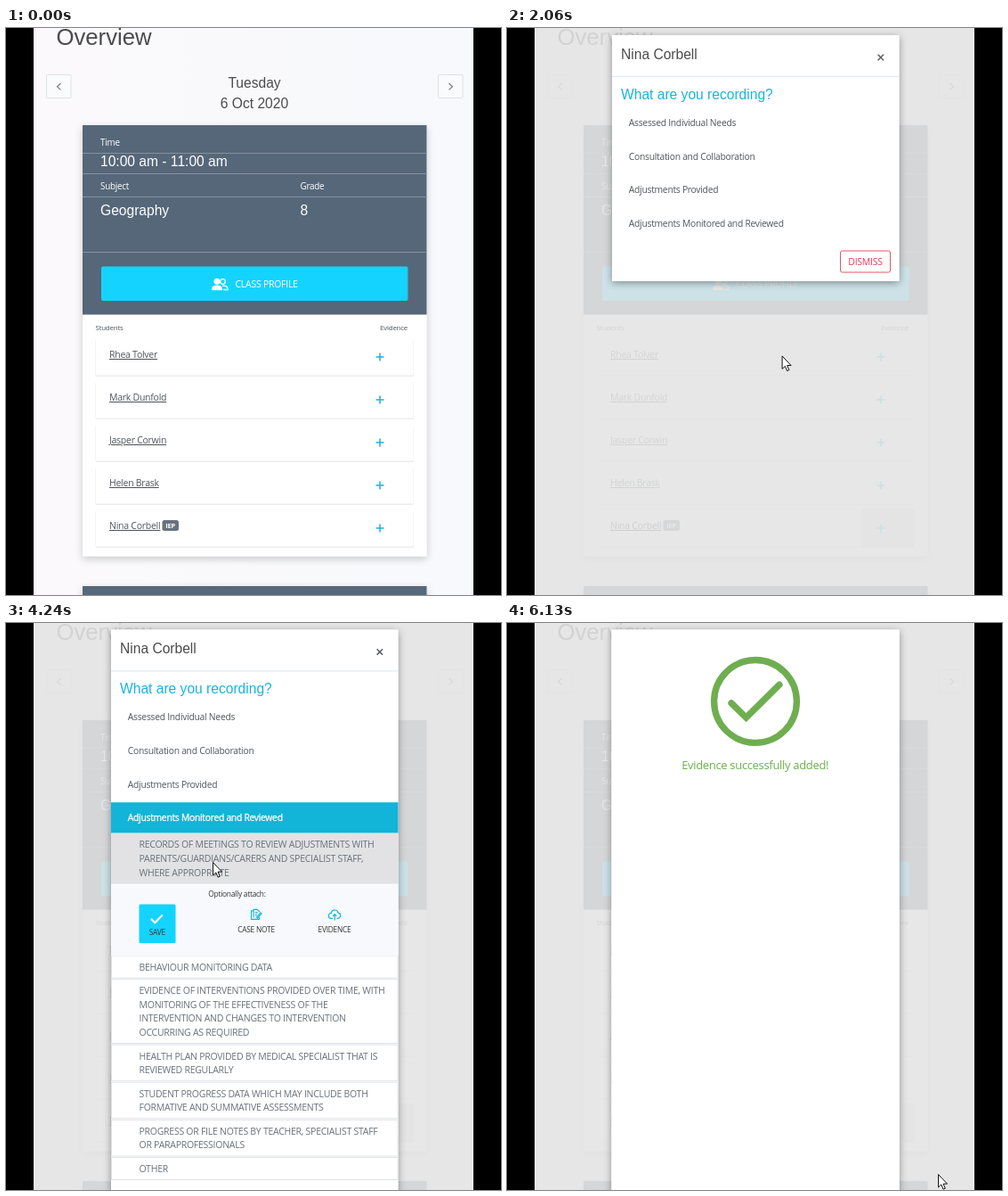
An HTML page for the animation above (6170 ms loop, 556x636 px).

```html
<!DOCTYPE html>
<html lang="en">
<head>
<meta charset="utf-8">
<title>Recording evidence</title>
<style>
  html, body { margin: 0; width: 100%; height: 100%; overflow: hidden; background: #000; }
  svg { display: block; width: 100%; height: 100%; }
  text { font: 10.5px "Open Sans", "Noto Sans", sans-serif; letter-spacing: -.025em; fill: #50565d; }
  .head { font: 15.6px "Liberation Sans", Arial, sans-serif; letter-spacing: 0; fill: #4b4b4d; }
  .title { font-size: 25.7px; }
  .light { fill: #fff; }
  .cyan { fill: #1bb3dc; }
  .label { font-size: 9.9px; }
  .tiny { font-size: 7.9px; }
  .mini { font-size: 8.3px; fill: #333; }
  .sub { fill: #68717b; }
  .badge { font-size: 7.5px; font-weight: 700; }
  .link { text-decoration: underline; }
  .red { fill: #dc4058; }
  .done { font-size: 13px; fill: #6ab04c; }
  .mid { text-anchor: middle; }
</style>
</head>
<body>
<svg id="stage" viewBox="0 0 556 636" preserveAspectRatio="none">
  <defs>
    <filter id="soft" x="-20%" y="-20%" width="140%" height="140%">
      <feDropShadow dx="0" dy="3" stdDeviation="4.5" flood-color="#000" flood-opacity=".2"/>
    </filter>
    <filter id="deep" x="-20%" y="-20%" width="140%" height="140%">
      <feDropShadow dx="0" dy="2" stdDeviation="4.5" flood-color="#000" flood-opacity=".38"/>
    </filter>
    <linearGradient id="paper">
      <stop offset="0" stop-color="#fbf9fb"/>
      <stop offset="1" stop-color="#f7f9fc"/>
    </linearGradient>
  </defs>
</svg>
<script>
const LOOP = 6170;
const NAMES = ["Rhea Tolver", "Mark Dunfold", "Jasper Corwin", "Helen Brask", "Nina Corbell"];
const CHOICES = ["Assessed Individual Needs", "Consultation and Collaboration",
  "Adjustments Provided", "Adjustments Monitored and Reviewed"];
const DETAILS = [
  ["RECORDS OF MEETINGS TO REVIEW ADJUSTMENTS WITH", "PARENTS/GUARDIANS/CARERS AND SPECIALIST STAFF,", "WHERE APPROPRIATE"],
  ["BEHAVIOUR MONITORING DATA"],
  ["EVIDENCE OF INTERVENTIONS PROVIDED OVER TIME, WITH", "MONITORING OF THE EFFECTIVENESS OF THE",
    "INTERVENTION AND CHANGES TO INTERVENTION", "OCCURRING AS REQUIRED"],
  ["HEALTH PLAN PROVIDED BY MEDICAL SPECIALIST THAT IS", "REVIEWED REGULARLY"],
  ["STUDENT PROGRESS DATA WHICH MAY INCLUDE BOTH", "FORMATIVE AND SUMMATIVE ASSESSMENTS"],
  ["PROGRESS OR FILE NOTES BY TEACHER, SPECIALIST STAFF", "OR PARAPROFESSIONALS"],
  ["OTHER"]
];
// time, x, y, easing power on the way in
const PATH = [
  [30, 467, 3], [620, 422, 580, .85], [800, 419.5, 567], [960, 422.5, 562], [1650, 422.5, 562],
  [2060, 309, 368, 1.1], [2270, 225.5, 247], [2510, 225.5, 229], [3170, 225.5, 229],
  [3270, 223.5, 229], [3380, 223.5, 229], [3580, 232, 268], [4620, 232, 268],
  [5030, 178.5, 336], [5800, 178.5, 336], [5960, 245, 424, 1.6], [6130, 484, 618]
];

const stage = document.getElementById("stage");
function el(tag, attrs, parent = stage) {
  const node = document.createElementNS("http://www.w3.org/2000/svg", tag);
  for (const k in attrs) node.setAttribute(k, attrs[k]);
  return parent.appendChild(node);
}
const group = parent => el("g", {}, parent);
const rect = (x, y, width, height, fill, parent, more) => el("rect", { x, y, width, height, fill, ...more }, parent);
const line = (d, stroke, width, parent, more) => el("path", { d, stroke, "stroke-width": width, fill: "none", ...more }, parent);
function text(x, y, str, cls, parent) {
  const node = el("text", { x, y, class: cls }, parent);
  node.textContent = str;
  return node;
}
const show = (node, on) => node.setAttribute("display", on ? "inline" : "none");
const shift = (node, x, y) => node.setAttribute("transform", `translate(${x} ${y})`);
const clamp = u => Math.max(0, Math.min(1, u));
const span = (t, from, length) => clamp((t - from) / length);
const smooth = u => u * u * (3 - 2 * u);
const mix = (a, b, u) => `rgb(${a.map((v, i) => Math.round(v + (b[i] - v) * u))})`;

// Page
rect(0, 0, 556, 636, "#000");
rect(31, 0, 494, 636, "url(#paper)");
text(56.5, 19, "Overview", "head title");
text(279, 67, "Tuesday", "head mid");
text(279, 90, "6 Oct 2020", "head mid");
for (const [x, dir] of [[45.5, -1], [485.5, 1]]) {
  rect(x, 52.5, 27.5, 26, "#fafbfd", stage, { stroke: "#dce1e7", rx: 1 });
  line(`M${x + 14 - dir * 2} 62l${dir * 4} 3.7l${-dir * 4} 3.7`, "#777b82", 1.2);
}
rect(86, 109, 386.5, 483.5, "#fff", stage, { filter: "url(#soft)" });
rect(86, 109, 386.5, 212.5, "#566779");
for (const y of [140.5, 163.5, 189.5, 251.5]) line(`M86 ${y}h386.5`, "#8491a0", 1);
text(106, 131.5, "Time", "label light");
text(106, 154.5, "10:00 am - 11:00 am", "head light");
text(106, 181, "Subject", "label light");
text(330.5, 181, "Grade", "label light");
text(106, 209.5, "Geography", "head light");
text(330.5, 209.5, "8", "head light");
rect(107, 267.5, 344.5, 38.5, "#15d3ff", stage, { rx: 2 });
line("M451 269v36", "#5a8fa5", 1, stage, { "stroke-dasharray": "1 1" });
const people = { fill: "#fff", stroke: "#fff" };
el("circle", { cx: 243.5, cy: 284.5, r: 2.8, fill: "none", stroke: "#fff", "stroke-width": 1.3 });
line("M243 289.3c3.8-.8 6.2 1 6.2 4.2h-5", "#fff", 1.3);
el("circle", { cx: 237, cy: 284.3, r: 3.4, ...people, "stroke-width": .3 });
el("path", { d: "M231.3 294v-1.5c0-2.8 2.4-3.8 5.7-3.8s5.7 1 5.7 3.8v1.5z", ...people, "stroke-width": .3 });
text(257.5, 290.5, "CLASS PROFILE", "light");
text(100.5, 338.5, "Students", "tiny");
text(420, 338.5, "Evidence", "tiny");
let lastName, hover;
NAMES.forEach((name, i) => {
  const y = 48 * i;
  rect(101, 389.5 + y, 356.5, 1.5, "#ededee");
  line(`M100.5 ${350 + y}v40M457.5 ${350 + y}v40`, "#f5f5f6", 1);
  if (i === 4) hover = rect(398.5, 539, 59.5, 43.5, "#e4e4e5");
  lastName = text(116, 370 + y, name, "link");
  line(`M415.5 ${369 + y}h9M420 ${364.5 + y}v9`, "#1bb3dc", 1.5);
});
rect(175.5, 552, 18.5, 12, "#69727b", stage, { rx: 2.5 });
text(184.7, 560.8, "IEP", "badge light mid");
rect(86, 626, 386.5, 20, "#566779", stage, { filter: "url(#soft)" });
const veil = rect(31, 0, 494, 636, "#e4e4e4", stage, { opacity: .885 });

// Dialog
const dialog = group();
const sheet = rect(118, 8, 322.5, 276, "#fff", dialog, { filter: "url(#deep)" });
const form = group(dialog);
text(128, 34.5, NAMES[4], "head", form);
line("M416.6 29.8l6.4 6.4m0-6.4l-6.4 6.4", "#5d6166", 1.6, form);
line("M118 54.5h322.5", "#d9e9f1", 1, form);
text(128, 80, "What are you recording?", "head cyan", form);
const bar = rect(118, 201.8, 322.5, 35, "#12b4d7", form);
let picked;
CHOICES.forEach((label, i) => {
  picked = text(136.8, 110 + 37.7 * i, label, "", form);
  picked.style.fontSize = "10.3px";
});
const dismiss = group(form);
rect(374.5, .5, 56, 24, "#fff", dismiss, { stroke: "#e2566b", rx: 2 });
text(402.5, 16.5, "DISMISS", "red mid", dismiss);

const first = group(form), rest = group(form);
let firstBack, mid = 249;
DETAILS.forEach((rows, i) => {
  const box = i ? rest : first;
  const top = mid - 12.5, end = mid + 15.6 * (rows.length - 1) + 12.5;
  const back = rect(118.5, top, 321.5, end - top, "#fff", box, { stroke: "#e0e3e7" });
  if (!i) firstBack = back;
  rows.forEach(row => {
    text(149.5, mid + 4, row, "sub", box);
    mid += 15.6;
  });
  mid += 10.95;
});

// Save panel
const panel = group(form);
const panelBack = rect(118, 294, 322.5, 80, "#f7f9fd", panel);
text(259.5, 307.3, "Optionally attach:", "mini mid", panel);
const save = rect(149.5, 316, 41, 43.5, "#15d3ff", panel, { rx: 1.5 });
const captions = group(panel);
text(169.8, 350.3, "SAVE", "mini light mid", captions);
text(281, 348, "CASE NOTE", "mini mid", captions);
text(369, 347.3, "EVIDENCE", "mini mid", captions);
const icons = group(panel);
line("M163 332.5l4.3 4.3l8.5-8.6", "#fff", 2.2, icons);
const cyan = "#16b5d8";
line("M284.5 330v3h-9v-9.500h2M278 331v-9h4l3 2.600M279.800 325.500h3M279.800 328h2M281.500 330.500l4.500-5l1 1l-4.500 5z", cyan, 1.1, icons);
line("M367 332h-1.500a3 3 0 0 1-.3-6a4 4 0 0 1 7.800-.5a3.300 3.300 0 0 1-.2 6.500h-1.300M369.200 334v-6.500m-2.200 2l2.200-2.200l2.200 2.200", cyan, 1.2, icons);

// Success
const success = group(dialog);
const GREEN = "#6fae50";
const ring = el("circle", { cx: 279, cy: 88.500, r: 46.400, pathLength: 390, fill: "none", stroke: GREEN,
  "stroke-width": 7.300, "stroke-dasharray": 1000 }, success);
const tick = line("M306 69.800L268.600 106.700L252 90.500", GREEN, 7.300, success,
  { pathLength: 100, "stroke-dasharray": 1000, "stroke-linecap": "round" });
text(278.700, 165, "Evidence successfully added!", "done mid", success);

rect(0, 0, 31, 636, "#000");
rect(525, 0, 31, 636, "#000");
const cursor = group();
el("path", { d: "M.5 .5v14.500l3.300-3.100l2.300 5.300l2.200-1l-2.300-5.100h4.500z", fill: "#fff", stroke: "#111", "stroke-width": 1 }, cursor);

function moveCursor(t) {
  show(cursor, t >= 30);
  let i = 1;
  while (i < PATH.length - 1 && t > PATH[i][0]) i++;
  const [t0, x0, y0] = PATH[i - 1], [t1, x1, y1, power = 1] = PATH[i];
  const u = span(t, t0, t1 - t0) ** power;
  shift(cursor, x0 + (x1 - x0) * u, y0 + (y1 - y0) * u);
}

function draw(t) {
  moveCursor(t);
  show(hover, t >= 1310);
  lastName.style.fill = t >= 1310 ? "#25292d" : "";
  show(veil, t >= 1480);

  const open = t >= 2890, attach = t >= 4030, loaded = t >= 4065, done = t >= 5370;
  const enter = 1 - (1 - span(t, 1650, 270)) ** 2;
  show(dialog, t >= 1650);
  dialog.setAttribute("opacity", enter);
  shift(dialog, 0, -40 * (1 - enter) - (attach ? .6 : 0));
  const push = loaded ? 79.500 : attach ? 68 : 0;
  const height = open ? 588.500 + push : 276;
  sheet.setAttribute("height", height);
  sheet.setAttribute("x", done ? 117.300 : 118);
  sheet.setAttribute("width", done ? 323.500 : 322.500);
  show(form, !done);
  shift(dismiss, 0, height - 26.500);

  for (const part of [bar, first, rest]) show(part, open);
  const lit = smooth(span(t, 2890, 140));
  picked.style.fill = mix([80, 86, 93], [255, 255, 255], lit);
  picked.style.stroke = lit === 1 ? "#fff" : "none";
  picked.style.strokeWidth = .3;
  picked.style.textDecoration = open && lit < 1 ? "underline" : "none";

  shift(rest, 0, push);
  show(panel, attach);
  show(icons, loaded);
  panelBack.setAttribute("height", loaded ? 80 : 69);
  save.setAttribute("height", loaded ? 43.500 : 32.500);
  shift(captions, 0, loaded ? 0 : -11.500);
  firstBack.setAttribute("fill", attach ? mix([248, 248, 250], [220, 220, 222], smooth(span(t, 4030, 300))) : "#fff");

  show(success, done);
  ring.setAttribute("stroke-dashoffset", 1000 - 1000 * smooth(span(t, 5355, 900)));
  const sweep = smooth(span(t, 5705, 900));
  show(tick, sweep > 0);
  tick.setAttribute("stroke-dashoffset", Math.min(0, 1000 * sweep - 100));
}

const start = performance.now();
function tickFrame() {
  draw((performance.now() - start) % LOOP);
  requestAnimationFrame(tickFrame);
}
tickFrame();
</script>
</body>
</html>
```
